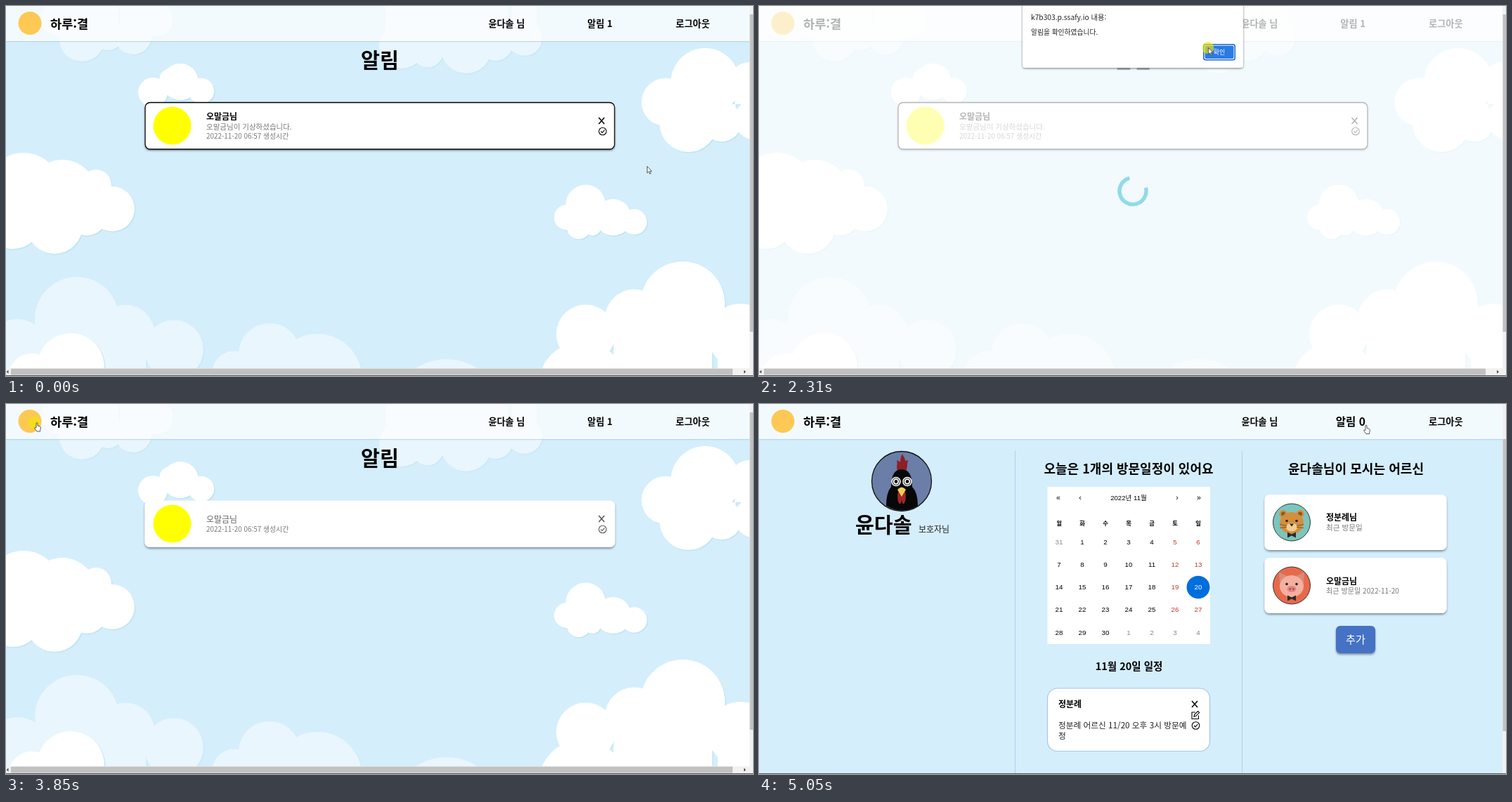
Recreate the animation shown at these times as an HTML page. Size 1063 px wide and 527 px high, loop 5120 ms.

```html
<!DOCTYPE html>
<html lang="ko">
<head>
<meta charset="utf-8">
<title>알림</title>
<style>
html, body { margin: 0; width: 100%; height: 100%; overflow: hidden; background: #d4eefc; }
svg { display: block; width: 100vw; height: 100vh; }
text { font-family: 'Noto Sans CJK KR', 'Noto Sans CJK', 'Noto Sans', sans-serif; white-space: pre; }
.cal text { font-family: 'Liberation Sans', 'Noto Sans CJK KR', sans-serif; }
</style>
</head>
<body>
<svg id="stage" viewBox="0 0 1063 527" xmlns="http://www.w3.org/2000/svg"></svg>
<script>
const LOOP = 5120, STEP = 1000 / 15;
const GUARDIAN = '윤다솔', ELDER_A = '정분례', ELDER_B = '오말금';

// ---------- drawing helpers ----------
const text = (x, y, s, size, { w = 400, fill = '#000', anchor = 'start', id = '' } = {}) =>
  `<text id="${id}" x="${x}" y="${y}" font-size="${size}" font-weight="${w}" fill="${fill}" text-anchor="${anchor}">${s}</text>`;
const bold = (x, y, s, size, o = {}) => text(x, y, s, size, { w: 700, ...o });
const rect = (x, y, w, h, fill, r = 0, extra = '') =>
  `<rect x="${x}" y="${y}" width="${w}" height="${h}" rx="${r}" fill="${fill}" ${extra}/>`;
const circle = (x, y, r, fill, extra = '') => `<circle cx="${x}" cy="${y}" r="${r}" fill="${fill}" ${extra}/>`;
const ellipse = (x, y, rx, ry, fill) => `<ellipse cx="${x}" cy="${y}" rx="${rx}" ry="${ry}" fill="${fill}"/>`;
const line = (d, color, w) => `<path d="${d}" fill="none" stroke="${color}" stroke-width="${w}"/>`;
const shape = (d, fill) => `<path d="${d}" fill="${fill}"/>`;
const group = (id, body, extra = '') => `<g id="${id}" ${extra}>${body}</g>`;
const mid = { anchor: 'middle' };

// A lobe followed by smaller ones marching left (count < 0) or right along a slope.
const ridge = (x, y, r, count = 0, slope = 0) =>
  Array.from({ length: Math.abs(count) + 1 }, (_, i) =>
    ({ x: x + Math.sign(count) * i * 1.15 * r, y: y + i * slope * r, r: i ? .7 * r : r }));

// Lobes with stems to a common level, over a soft blue lower edge.
function cloud(level, opacity, ...ridges) {
  const body = ridges.flat().map(({ x, y, r }) => circle(x, y, r, 'inherit') +
    rect(x - .7 * r, Math.min(y, level), 1.4 * r, Math.abs(y - level), 'inherit')).join('').replaceAll('fill="inherit"', '');
  return `<g opacity="${opacity}"><g fill="#c3e5f2" transform="translate(1.5 1.5)">${body}</g><g fill="#fff">${body}</g></g>`;
}

const cross = (x, y, color) => line(`M${x - 4} ${y - 4.6}l8 9.2m0-9.2l-8 9.2`, color, 1.5);
const check = (x, y, color) =>
  circle(x, y, 5.3, 'none', `stroke="${color}" stroke-width="1.1"`) + line(`M${x - 2.5} ${y}l2 2 3.2-3.8`, color, 1.1);
const pencil = (x, y) =>
  line(`M${x} ${y - 4}h-5v9.5h9.5v-5M${x - 2} ${y + 2.2}l.6-2.6 5-5 2 2-5 5z`, '#000', 1.1);

function sky() {
  return rect(0, 0, 1058, 516, '#d4eefc') +
    cloud(0, .5, ridge(108, 47, 32, 1, -.2), ridge(181, 43, 26, 1, -.85), ridge(215, 20, 23), ridge(75, 18, 25)) +
    cloud(0, .5, ridge(655, 60, 36, 2, -.2), ridge(563, 57, 32, 1, .25), ridge(586, 16, 35), ridge(630, 45, 30)) +
    cloud(125, 1, ridge(248, 108, 26, 1, .5), ridge(209, 123, 21, 1, -.9)) +
    cloud(285, 1, ridge(25, 262, 53), ridge(80, 268, 49), ridge(128, 255, 22), ridge(151, 289, 32), ridge(69, 313, 40, 1, -.35), ridge(10, 305, 41)) +
    cloud(305, 1, ridge(825, 283, 28.5), ridge(864, 301, 26, 1, .25), ridge(798, 301, 18), ridge(815, 315, 17, 1)) +
    cloud(140, 1, ridge(995, 109, 49, -1, .57), ridge(1058, 110, 30), ridge(971, 167, 41, 2, -.06)) +
    cloud(527, 1, ridge(963, 424, 60, -2, .36), ridge(1045, 470, 46), ridge(820, 540, 62)) +
    cloud(527, .5, ridge(101, 446, 60, 2, .36), ridge(16, 490, 44)) +
    cloud(527, .5, ridge(375, 496, 44, -1, .6), ridge(443, 531, 64)) +
    cloud(527, .5, ridge(627, 583, 80)) +
    cloud(527, 1, ridge(92, 514, 48, -1, .3));
}

function noticePage() {
  const icons = color => cross(847.5, 163.5, color) + check(849, 178.5, color);
  const stamp = y => text(285, y, '2022-11-20 06:57 생성시간', 9.9, { fill: '#777' });
  return sky() + bold(532, 88, '알림', 29.3, mid) +
    rect(197.5, 137.5, 669, 66.5, '#fff', 7, 'filter="url(#shade)"') + circle(236.5, 170.5, 27, '#ff0') +
    group('unread', rect(198, 137.5, 668, 66.5, 'none', 7, 'stroke="#000" stroke-width="1.3"') +
      bold(285, 162, ELDER_B + '님', 12) +
      text(285, 176, ELDER_B + '님이 기상하셨습니다.', 10.5, { fill: '#777' }) + stamp(188.5) + icons('#000')) +
    group('read', text(285, 168.5, ELDER_B + '님', 12, { fill: '#666' }) + stamp(182) + icons('#555'));
}

function rooster() {
  const eye = x => circle(x, 110.5, 6.8, '#fff') + circle(x, 110.5, 5.2, '#222') + circle(x, 110.5, 4.2, '#fff') + circle(x, 110.5, 2.4, '#111');
  return circle(203, 110, 42.5, '#6a7ea8', 'stroke="#111" stroke-width="1.3"') +
    shape('M198 97c-4-8 0-10-2-17 3 1 4 2 5 3 0-5 1-9 3-12 1 4 4 5 4 10 2-1 3-1 4 0-2 5 0 10-4 16z', '#8e1f24') +
    shape('M181 145Q181 126 188 118Q188 93 203 93T218 118Q226 126 226 145A42 42 0 0 1 181 145z', '#080808') +
    shape('M198 125c-2 8 0 16 2 17s3-3 3-8c0 5 1 9 3 8s4-9 2-17z', '#a3262b') +
    eye(195) + eye(211) + shape('M197 122Q203 115 209 122L203 132z', '#f2cf55');
}

function animal(y, { bg, fur, inner, muzzle, pig }) {
  const side = s => pig
    ? shape(`M${5 * s}-13L${18 * s}-19L${17 * s}-3z`, inner) + circle(10 * s, 7, 3, '#ef6d68')
    : circle(12 * s, -12, 5.5, fur) + circle(12 * s, -12, 3, inner);
  const features = s => circle(7 * s, -2, 1.8, '#222') +
    (pig ? circle(2.3 * s, 5, 1.2, '#8d3f42') : line(`M${7 * s} 5l${10 * s}-2m${-10 * s} 4l${10 * s} 1`, '#573a20', .7));
  const nose = pig ? ellipse(0, 5, 6.5, 4.5, muzzle) : ellipse(0, 7, 8, 6, muzzle) + shape('M-3 2h6l-3 4z', '#222');
  return group('', circle(0, 0, 26.5, bg, 'stroke="#333"') + side(-1) + side(1) + ellipse(0, 1, 17, 15.5, fur) +
    nose + features(-1) + features(1) + shape('M-6 14l6 3 6-3v8l-6-3-6 3z', '#2d2a2b'), `transform="translate(758 ${y})"`);
}

function calendar() {
  const column = i => 427 + 33 * i;
  let out = rect(410.5, 118, 231.5, 224, '#fff') + text(526, 137, '2022년 11월', 9.6, mid);
  [...'«‹›»'].forEach((s, i) => out += text(426 + 31 * i + (i > 1 ? 107 : 0), 136.5, s, 10.5, mid));
  [...'월화수목금토일'].forEach((d, i) => out += bold(column(i), 173, d, 8.3, mid));
  out += ellipse(625, 261, 16.5, 16.2, '#006edc');
  for (let i = 0; i < 35; i++) {
    const inMonth = i > 0 && i <= 30, label = inMonth ? i : i || 31;
    const fill = !inMonth ? '#858585' : i === 20 ? '#fff' : i % 7 > 4 ? '#c0392b' : '#000';
    out += text(column(i % 7), 199.8 + 32.2 * Math.floor(i / 7), inMonth || !i ? label : label - 30, 9.8, { ...mid, fill });
  }
  return group('', out, 'class="cal"');
}

function homePage() {
  const bear = { bg: '#7cc5bd', fur: '#d58f3c', inner: '#8f5627', muzzle: '#f0cd92' };
  const pig = { bg: '#e8694a', fur: '#f3b0a0', inner: '#d98c78', muzzle: '#e5847d', pig: true };
  const elder = y => rect(719.5, y, 259, 79, '#fff', 7, 'filter="url(#shade)"');
  const visit = (y, s, size) => text(807, y, '최근 방문일' + s, size, { fill: '#777' });
  return rect(0, 0, 1058, 526, '#d4eefc') + line('M364.5 67V527M687.5 67V527', '#b4d0ea', 1) +
    rooster() + bold(137, 183, GUARDIAN, 29.2) + text(227, 183, '보호자님', 12, { fill: '#222' }) +
    bold(526, 99, '오늘은 1개의 방문일정이 있어요', 18, mid) + calendar() +
    bold(526.5, 379, '11월 20일 일정', 14.5, mid) +
    rect(410.5, 405, 231, 89.5, '#fff', 14, 'stroke="#a9c4e8" stroke-width="1.2"') +
    bold(426, 431.5, ELDER_A, 12) +
    text(426, 462, ELDER_A + ' 어르신 11/20 오후 3시 방문예', 11.7, { fill: '#222' }) +
    text(426, 476.5, '정', 11.7, { fill: '#222' }) +
    bold(849.5, 99, GUARDIAN + '님이 모시는 어르신', 18.1, mid) + elder(129) + elder(219) +
    animal(168.5, bear) + visit(179.5, '', 10.6) +
    group('pending', animal(258.5, bear) + bold(807, 166, '님', 12) + bold(807, 256.5, '님', 12) + visit(269.5, '', 10.6)) +
    group('filled', animal(258.5, pig) + bold(807, 166, ELDER_A + '님', 12) + bold(807, 256.5, ELDER_B + '님', 12) + visit(269.5, ' 2022-11-20', 10.1)) +
    rect(821, 316, 56, 39, '#4472c4', 6, 'filter="url(#shade)"') + text(849, 341, '추가', 15.2, { ...mid, fill: '#fff' });
}

const nav = () => rect(0, 0, 1058, 50, '#fff', 0, 'fill-opacity=".72"') + rect(0, 50, 1058, 1.2, '#9fbccb', 0, 'opacity=".5"') +
  circle(34, 24.5, 16.5, '#fdc954') + bold(63, 32, '하루:결', 17.6) +
  bold(686.5, 30, GUARDIAN + ' 님', 13.1) + bold(863, 30, '', 13.2, { anchor: 'end', id: 'badge' }) + bold(953, 30, '로그아웃', 13.2);

const dialog = () => rect(375, -8, 314, 96, '#fff', 4, 'filter="url(#pop)"') +
  text(387, 20, 'k7b303.p.ssafy.io 내용:', 10.25, { fill: '#222' }) +
  text(387, 40.5, '알림을 확인하였습니다.', 9.75, { fill: '#222' }) +
  rect(632, 54, 46, 23.5, '#1a66cc', 3.5) + rect(633.5, 55.5, 43, 20.5, '#fff', 2.5) + rect(634.5, 56.5, 41, 18.5, '#2a7be2', 2) +
  text(655, 69, '확인', 9, { ...mid, fill: '#fff' });

const scrollbars = () => rect(1058, 0, 5, 527, '#f1f1f1') + rect(1058.5, 0, 4.5, 0, '#c1c1c1', 0, 'id="thumb"') +
  group('hbar', rect(0, 516, 1063, 10, '#f1f1f1') + rect(7, 516.5, 1027, 9, '#c1c1c1') +
    shape('M3.5 518.5v5l-3-2.5zM1050 518.5v5l3-2.5z', '#555')) + rect(0, 526, 1063, 1, '#555');

const pointerShape = (id, d) => group(id, `<path d="${d}" fill="#fff" stroke="#333" stroke-width=".8"/>`);
const shadow = (id, dy, blur, opacity) =>
  `<filter id="${id}" x="-10%" y="-20%" width="120%" height="150%"><feDropShadow dx="0" dy="${dy}" stdDeviation="${blur}" flood-opacity="${opacity}"/></filter>`;

document.getElementById('stage').innerHTML =
  `<defs>${shadow('shade', 2, 1.4, .4)}${shadow('pop', 1, 1.6, .5)}</defs>` +
  group('notices', noticePage()) + group('home', homePage()) + nav() +
  rect(0, 0, 1058, 526, '#fff', 0, 'id="wash"') +
  group('tools', cross(620, 427.5, '#000') + pencil(621, 443) + check(621.5, 458, '#000')) +
  group('spinner', line('M13.43-13.43A19 19 0 1 1-13.43-13.43', '#8fdbe8', 5.4)) +
  group('alert', dialog()) + scrollbars() + circle(0, 0, 8.5, '#f0e800', 'id="ripple" opacity=".65"') +
  pointerShape('arrow', 'M.4.4V9.8L2.6 7.8 4.1 11.2 5.6 10.5 4.1 7.3H7z') +
  pointerShape('hand', 'M3 8V1.2q1-1.4 2 0V5l3.6 1q1 .4.8 2l-.8 3.5V13H4L1 9q-.6-1.6.6-1.5z');

// ---------- motion ----------
const el = id => document.getElementById(id);
const show = (id, on) => el(id).setAttribute('display', on ? 'inline' : 'none');
const set = (id, attrs) => Object.entries(attrs).forEach(([k, v]) => el(id).setAttribute(k, v));
const within = (t, a, b) => t >= a && t < b;
const ease = k => k * k * (3 - 2 * k);

// Pointer strokes between the things it visits.
const strokes = [
  { from: 415, to: 1110, x: 849, y: 180 },
  { from: 1510, to: 1980, x: 639, y: 59 },
  { from: 2400, to: 3000, x: 440, y: 285 },
  { from: 3190, to: 3340, x: 76, y: 46 },
  { from: 3340, to: 3700, x: 40, y: 26 },
  { from: 3860, to: 3980, x: 115, y: 60 },
  { from: 3980, to: 4390, x: 977, y: 50 },
  { from: 4390, to: 4900, x: 860, y: 29.5 },
];
function pointer(t) {
  let x = 912, y = 228;
  for (const s of strokes) {
    const k = ease(Math.min(1, Math.max(0, (t - s.from) / (s.to - s.from))));
    x += (s.x - x) * k;
    y += (s.y - y) * k;
  }
  return [x, y];
}

function render(time) {
  // The picture advances at 15 steps a second.
  const t = Math.max(0, Math.floor((time - 40) / STEP) * STEP + 50);
  const home = t >= 3910, read = t >= 2500, arriving = within(t, 3910, 4190);
  const loading = within(t, 1370, 2500) || within(t, 3910, 4250);
  const [x, y] = pointer(t);
  const onBadge = home && within(x, 815, 868) && y < 45;
  const onLogo = within(t, 3380, 3910) && x < 74 && y < 44;
  const hovering = onBadge || onLogo;

  show('notices', !home); show('home', home); show('hbar', !home);
  show('unread', !read); show('read', read);
  show('pending', arriving); show('filled', !arriving);
  show('tools', home); set('tools', { opacity: loading ? .3 : 1 });
  show('wash', loading); set('wash', { opacity: arriving ? .91 : .7, height: home ? 526 : 516 });
  show('spinner', loading);
  set('spinner', { transform: `translate(532 263.5) rotate(${(t - (home ? 3829 : 1232)) * .36})` });
  show('alert', within(t, 1500, 2370));
  set('thumb', home ? { y: 50, height: 416 } : { y: 12, height: 452 });

  el('badge').textContent = home ? '알림 0' : '알림 1';
  set('badge', { 'font-size': onBadge ? 15.6 : 13.2, y: onBadge ? 31 : 30 });

  show('ripple', within(t, 1240, 1370) || within(t, 2300, 2370) || within(t, 3740, 3910));
  set('ripple', { cx: x, cy: y + .7 });
  show('hand', hovering); show('arrow', !hovering);
  for (const id of ['hand', 'arrow']) set(id, { transform: `translate(${x} ${y})` });
}

const start = performance.now();
function frame() {
  render((performance.now() - start) % LOOP);
  requestAnimationFrame(frame);
}
render(0);
requestAnimationFrame(frame);
</script>
</body>
</html>
```
